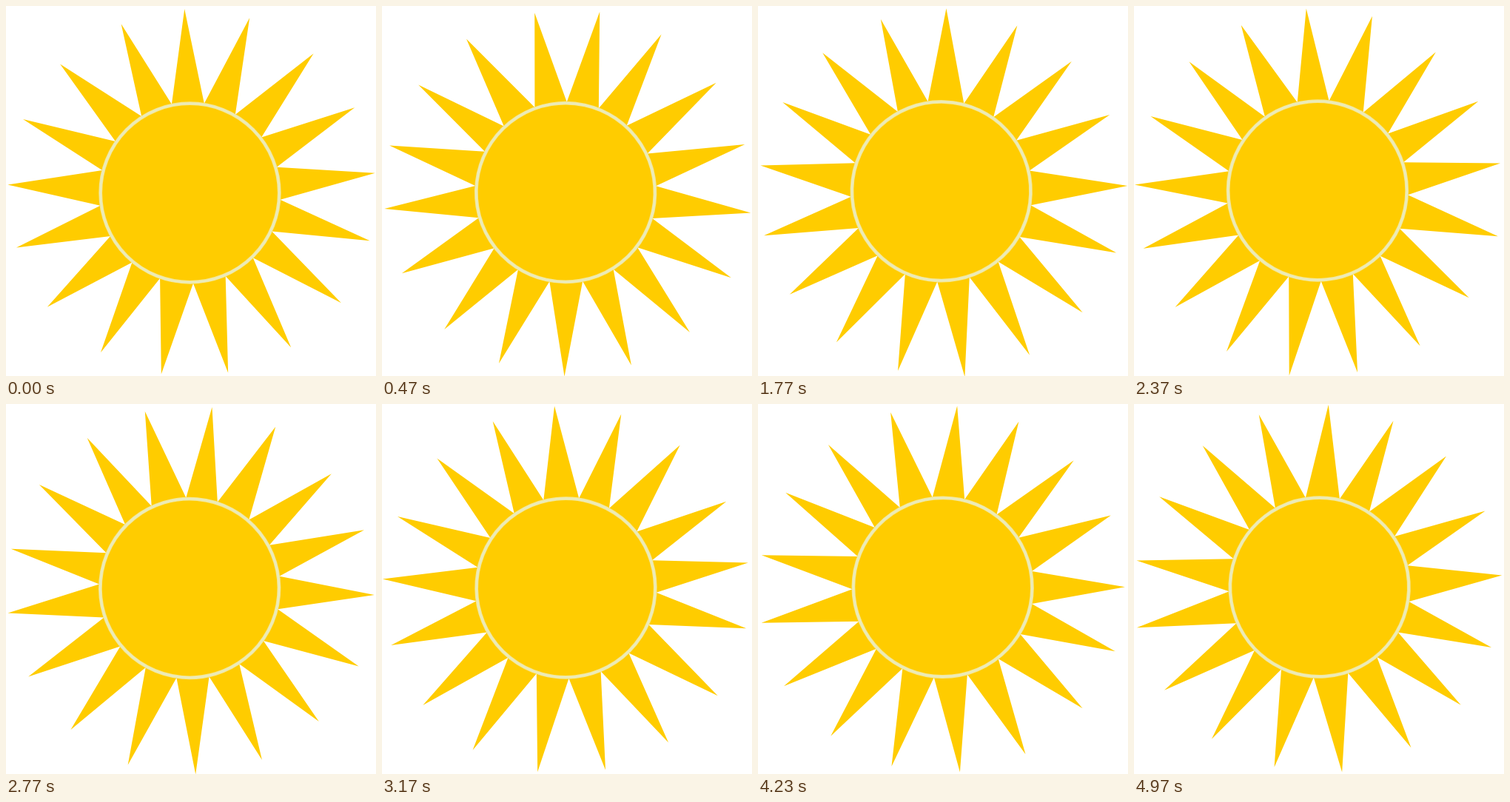
Write an HTML page that moves like this. It is 500 px wide and 500 px high and loops after 5.01 s.

```html
<!DOCTYPE html>
<html lang="en">
<head>
<meta charset="utf-8">
<title>Turning sun</title>
<style>
  html, body { margin: 0; height: 100%; overflow: hidden; background: #fff; }
  svg { display: block; width: 100%; height: 100%; }
</style>
</head>
<body>
<svg viewBox="0 0 500 500">
  <g id="sun" fill="#fc0">
    <path id="rays"/>
    <g transform="translate(-2.2 2)">
      <circle r="120.8" stroke="#f5e690" stroke-width="4.8"/>
      <circle r="120.8" fill="none" stroke="#ebebb9" stroke-width="3"/>
    </g>
  </g>
</svg>
<script>
const LOOP = 5010, STEPS = 150, STEP_ANGLE = 360 / 17 / 24;
const PIVOT = [250.7, 250.5];  // the disc sits slightly off this point

// Hand-cut rays: tip angle and length about the pivot, notch angle about the disc.
// Angles are in degrees clockwise from the top.
const tips = [-2.2, 18.5, 41.5, 62.8, 84.3, 105.5, 126.7, 147.5, 168.6,
  189.4, 209.4, 231.3, 252.2, 272.1, 293.2, 314.1, 337.2];
const lengths = [246.7, 247.3, 248.8, 247.9, 249.3, 250.1, 252.3, 250.3, 250.2,
  250.3, 250, 249.8, 248.6, 248.5, 247.7, 247.3, 245.3];
const notches = [9.1, 30.1, 52.2, 73.5, 94.3, 115.1, 135.8, 156.8, 177.9,
  199.3, 219.7, 241.4, 261.9, 284.5, 304.7, 327.7, 348.4];

const polar = (angle, r, x = 0, y = 0) => {
  const a = angle * Math.PI / 180;
  return [(x + r * Math.sin(a)).toFixed(2), (y - r * Math.cos(a)).toFixed(2)];
};

const outline = tips.flatMap((tip, i) =>
  [polar(tip, lengths[i]), polar(notches[i], 122.3, -2.2, 2)]);
document.getElementById('rays').setAttribute('d', `M${outline.join('L')}Z`);

const sun = document.getElementById('sun');
function draw(now) {
  const step = Math.min(STEPS - 1, Math.floor((now % LOOP + 4) * 0.03));
  sun.setAttribute('transform', `translate(${PIVOT}) rotate(${step * STEP_ANGLE})`);
  requestAnimationFrame(draw);
}
draw(0);
</script>
</body>
</html>
```
